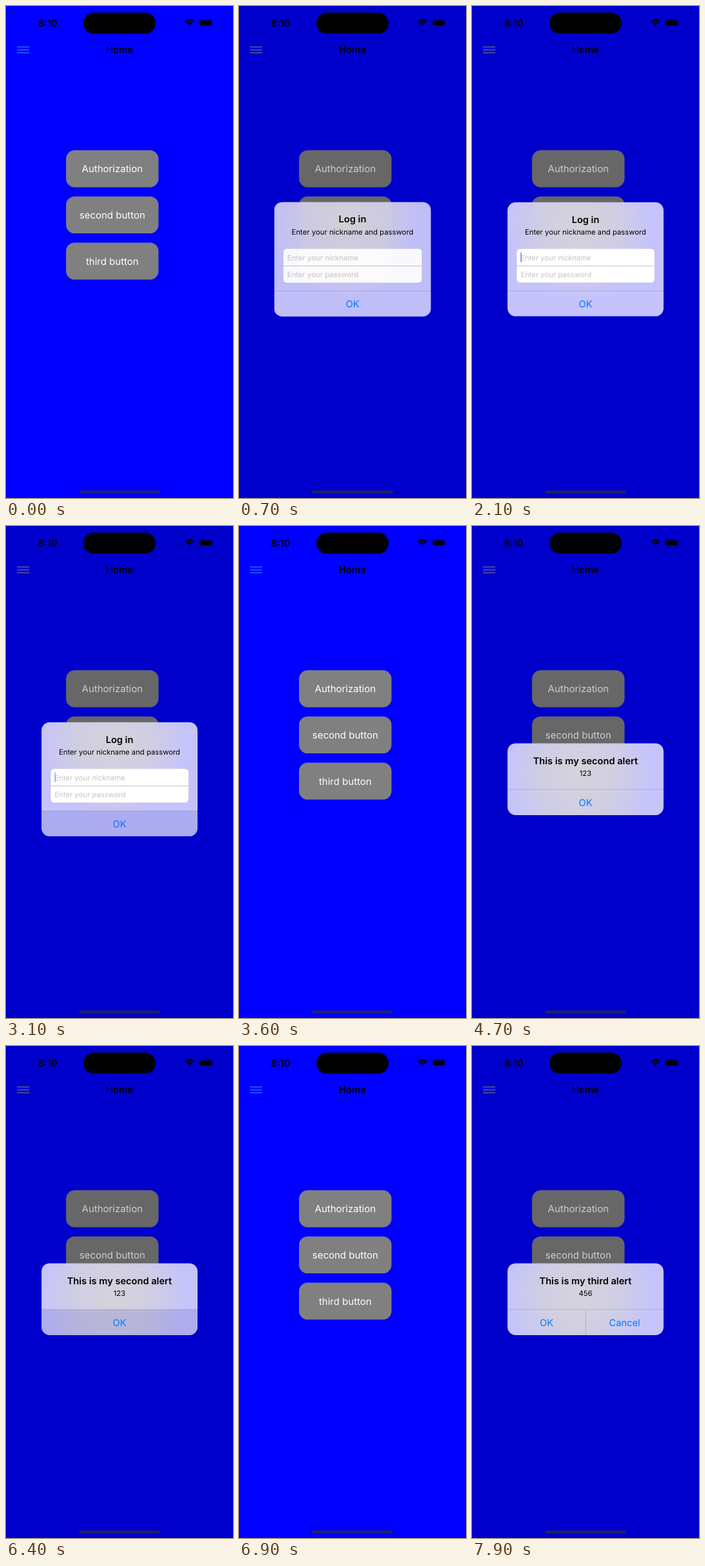
Recreate the animation shown at these times as an HTML page. Size 352 by 764 pixels, loop 8 s.

```html
<!DOCTYPE html>
<html lang="en">
<head>
<meta charset="utf-8">
<title>Alerts</title>
<style>
  html, body { margin: 0; height: 100%; overflow: hidden; background: #00f; }
  svg { display: block; width: 100vw; height: 100vh; }
  text { font-family: Inter, Roboto, sans-serif; text-anchor: middle; text-rendering: geometricPrecision; }
  .label { font-size: 15px; fill: #fff; }
  .bar { font-size: 14.8px; font-weight: 600; }
  .title { font-size: 14.6px; font-weight: 600; }
  .message { font-size: 11.3px; }
  .hint { font-size: 11.3px; fill: #c4c4c7; text-anchor: start; }
  .action { font-size: 14.7px; fill: #007aff; }
  .rule { stroke: #3c3c60; stroke-opacity: .22; stroke-width: .8; }
</style>
</head>
<body>
<svg viewBox="0 0 352 764" preserveAspectRatio="none">
  <defs>
    <radialGradient id="glow0" gradientUnits="userSpaceOnUse" cx="166" cy="338" r="115">
      <stop offset="0" stop-color="#d3d3d9"/><stop offset=".55" stop-color="#cfcde4"/><stop offset="1" stop-color="#c5c3fb"/>
    </radialGradient>
    <radialGradient id="glow1" gradientUnits="userSpaceOnUse" cx="166" cy="388" r="115">
      <stop offset="0" stop-color="#d5d3da"/><stop offset=".55" stop-color="#cfcde4"/><stop offset="1" stop-color="#c5c4fb"/>
    </radialGradient>
    <clipPath id="clip0"><rect x="55.1" y="304.8" width="241.9" height="177" rx="12.5"/></clipPath>
    <clipPath id="clip1"><rect x="55.1" y="337.4" width="241.9" height="111.5" rx="12.5"/></clipPath>
  </defs>

  <rect width="352" height="764" fill="#00f"/>
  <g id="buttons"></g>
  <path id="menu" d="M17 63.7h19M17 68.2h19M17 72.7h19" stroke-width="1.3"/>
  <text class="bar" x="176" y="73.4">Home</text>
  <rect id="dim" width="352" height="764"/>

  <text class="bar" x="64.5" y="31.8">8:10</text>
  <rect x="120" y="10.3" width="112" height="32.7" rx="16.3"/>
  <path d="M254 30h.01M259.5 30h.01M265 30h.01M270.5 30h.01" stroke="#000" stroke-opacity=".25" stroke-width="2.6" stroke-linecap="round"/>
  <g fill="none" stroke="#000" stroke-width="2.1">
    <path d="M277.6 24.6a9.6 9.6 0 0 1 13.8 0M280.3 27.4a5.9 5.9 0 0 1 8.4 0"/>
    <path d="M282.3 29.3a3.1 3.1 0 0 1 4.4 0L284.5 31.6z" fill="#000" stroke="none"/>
  </g>
  <rect x="298.9" y="20.8" width="21.4" height="10.8" rx="3.6" fill="none" stroke="#000" stroke-opacity=".35" stroke-width=".9"/>
  <rect x="300.4" y="22.3" width="18.4" height="7.8" rx="2.3"/>
  <path d="M321.4 24.5q1.6 1.7 0 3.5z" fill-opacity=".4"/>

  <g id="alerts"></g>
  <rect x="113.2" y="752.4" width="125.6" height="4.4" rx="2.2" fill="#2f2f3a" fill-opacity=".75"/>
</svg>
<script>
const $ = id => document.getElementById(id);
const text = (cls, x, y, s) => `<text class="${cls}" x="${x}" y="${y}">${s}</text>`;
const rule = d => `<path class="rule" d="${d}"/>`;

$('buttons').innerHTML = ['Authorization', 'second button', 'third button'].map((s, i) => {
  const y = 224 + i * 71.7;
  return `<rect x="93.1" y="${y}" width="143.4" height="57.4" rx="13.4" fill="#808080"/>` +
    text('label', 164.8, y + 34.4, s);
}).join('');

// Panel with title, message and a row of actions below the line at rowY
function panel(kind, titleY, title, message, rowY, actions, extra = '') {
  const w = 241.9 / actions.length;
  return `<g><g clip-path="url(#clip${kind})">
    <rect x="55" y="304" width="243" height="179" fill="url(#glow${kind})"/>
    <rect class="press" x="55" y="${rowY}" width="243" height="42" fill="#000096" fill-opacity=".12"/>
    ${rule(`M55 ${rowY}h243`)}${actions.length > 1 ? rule(`M176.3 ${rowY}v42`) : ''}</g>
    ${text('title', 176, titleY, title)}${text('message', 176, titleY + 18.5, message)}
    ${actions.map((s, i) => text('action', 55.1 + w * (i + .5), rowY + 25.8, s)).join('')}${extra}</g>`;
}

const fields = `<rect x="69" y="376.8" width="214.3" height="53" rx="5.5" fill="#fff" stroke="#3c3c60" stroke-opacity=".2" stroke-width=".6"/>
  <path d="M69 403.6h214.3" stroke="#bcbcc6" stroke-width=".9"/>
  ${text('hint', 75.3, 394.8, 'Enter your nickname')}${text('hint', 75.3, 421.3, 'Enter your password')}
  <rect id="caret" x="75.2" y="382.6" width="1.8" height="15.6" rx=".9" fill="#3478f6"/>`;

$('alerts').innerHTML =
  panel(0, 336.7, 'Log in', 'Enter your nickname and password', 442.2, ['OK'], fields) +
  panel(1, 369.7, 'This is my second alert', '123', 409.2, ['OK']) +
  panel(1, 369.7, 'This is my third alert', '456', 409.2, ['OK', 'Cancel']);

// Times in ms: shown, pressed, dismissed
const times = [[450, 3000, 3150], [4050, 6400, 6550], [7450, 9000, 9000]];
const caretKeys = [[1000, 0], [1100, 1], [1300, 1], [1700, 0], [2000, 0], [2100, .7],
  [2200, 1], [2300, 1], [2600, 0], [3000, 0], [3200, 1], [8000, 1]];

// Critically damped spring from 0 to 1
function spring(ms) {
  const x = Math.max(0, ms) * .0228;
  return 1 - (1 + x) * Math.exp(-x);
}

function caretAlpha(t) {
  const i = caretKeys.findIndex(k => k[0] > t);
  if (i < 1) return 0;
  const [t0, a] = caretKeys[i - 1], [t1, b] = caretKeys[i];
  return a + (b - a) * (t - t0) / (t1 - t0);
}

function draw(t) {
  let dim = 0;
  times.forEach(([shown, pressed, gone], i) => {
    const enter = spring(t - shown), alpha = enter * (1 - spring(t - gone));
    const g = $('alerts').children[i], scale = 1.2 - .2 * enter;
    g.style.display = alpha > .004 ? '' : 'none';
    g.setAttribute('opacity', alpha > .99 ? 1 : alpha);
    g.setAttribute('transform', `translate(176 393.3) scale(${scale}) translate(-176 -393.3)`);
    g.querySelector('.press').setAttribute('opacity', t >= pressed ? 1 : 0);
    dim = Math.max(dim, alpha);
  });
  $('dim').setAttribute('opacity', .2 * dim);
  $('menu').setAttribute('stroke', `rgb(${40 + 90 * dim},${124 + 6 * dim},${255 - 85 * dim})`);
  $('caret').setAttribute('opacity', caretAlpha(t));
}

const start = performance.now();
function tick() {
  const t = (performance.now() - start) % 8000;
  draw(Math.floor(t / 100) * 100); // ten pictures a second
  requestAnimationFrame(tick);
}
tick();
</script>
</body>
</html>
```
